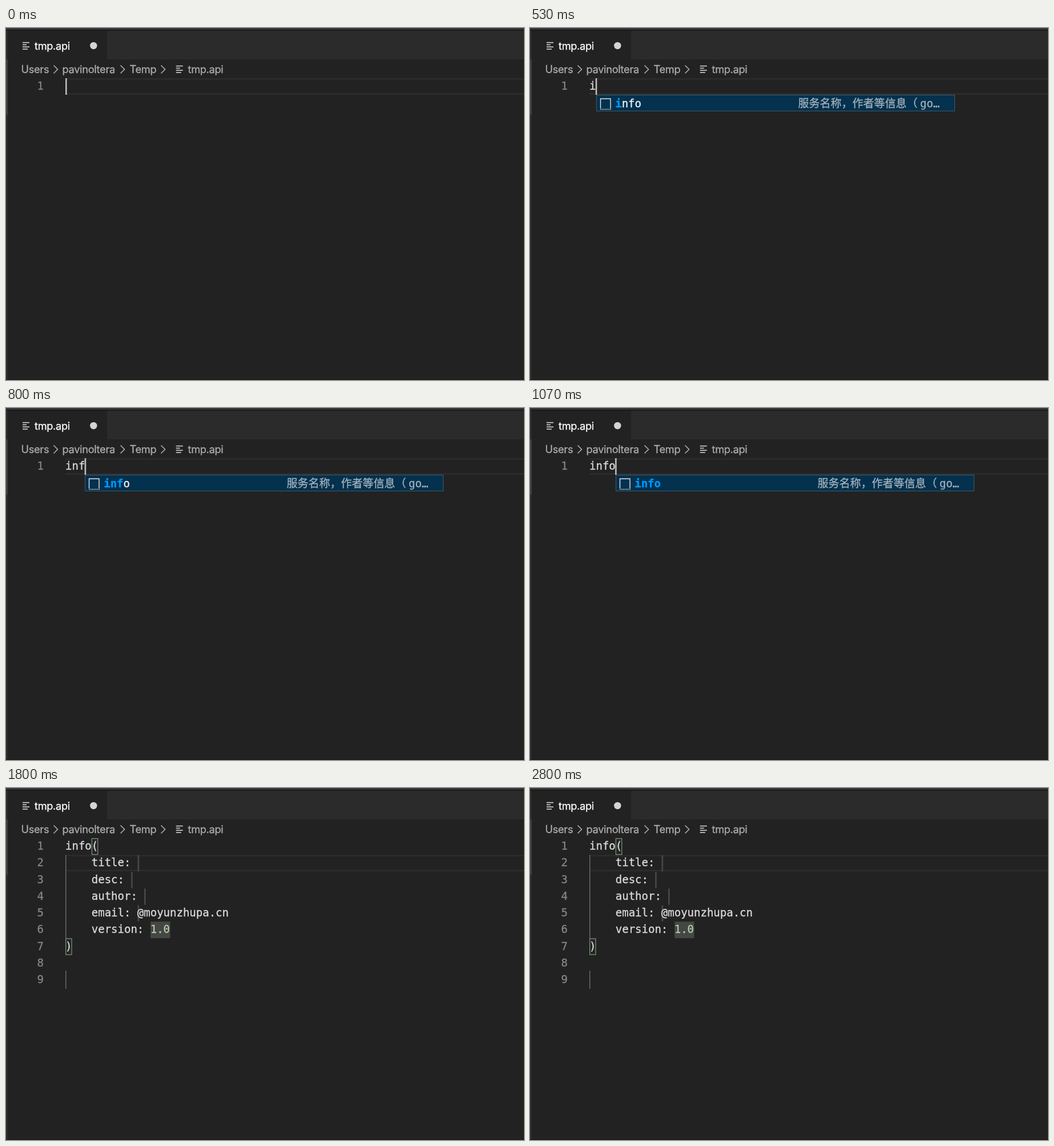
An HTML page that plays this animation: 907 by 617 pixels, repeating every 2.91 s.

```html
<!DOCTYPE html>
<html lang="zh-CN">
<head>
<meta charset="utf-8">
<title>tmp.api</title>
<style>
html, body { margin: 0; width: 100%; height: 100%; overflow: hidden; background: #222; }
svg { display: block; width: 907px; height: 617px; }
text, tspan { white-space: pre; fill: currentColor; stroke: currentColor; stroke-width: 0.3px; }
.ui { font: 18.2px Inter, "Open Sans", sans-serif; letter-spacing: -0.3px; color: #adadad; }
.tab { color: #fff; }
.code { font: 19px "DejaVu Sans Mono", "Liberation Mono", monospace; color: #dcdcdc; }
.num { color: #868686; }
.value { color: #b5cea8; }
.word { color: #f4f4f4; }
.hit { font-weight: bold; color: #0097fb; }
.cjk { font: 19px "Noto Sans CJK SC", "Noto Sans CJK", sans-serif; }
.hint { color: #a3b2bd; }
</style>
</head>
<body>
<svg id="stage" viewBox="0 0 907 617" xmlns="http://www.w3.org/2000/svg"></svg>
<script>
const LOOP = 2910;
const LEFT = 104, TOP = 88, ROW = 29.25, CHAR = 11.44;
const stage = document.getElementById("stage");

const col = n => LEFT + n * CHAR;
const row = n => TOP + (n - 1) * ROW;
const rect = (x, y, w, h, fill, more = "") =>
  `<rect x="${x}" y="${y}" width="${w}" height="${h}" fill="${fill}" ${more}/>`;
const text = (x, y, s, cls, more = "") =>
  `<text x="${x}" y="${y}" class="${cls}" ${more}>${s}</text>`;
const code = (c, n, s, cls = "") => text(col(c), row(n) + 20, s, "code " + cls);
const number = n => text(66, row(n) + 20, n, "code num", 'text-anchor="end"');

function fileIcon(x, y, fill) {
  return [12, 7, 12, 9].map((w, i) => rect(x, y + i * 3.8, w, 1.6, fill)).join("");
}

function chevron(x) {
  return `<path d="M${x} 65.5l7 7l-7 7" fill="none" stroke="#adadad" stroke-width="1.6"/>`;
}

function frame() {
  const crumb = (x, s) => text(x, 79, s, "ui");
  return rect(0, 0, 907, 617, "#222") +
    rect(177, 4, 730, 51, "#2b2b2b") +
    rect(0, 0, 907, 3, "#37373a") +
    rect(0, 3, 907, 1.5, "#171717") +
    rect(0, 4.5, 3, 612, "#2c2c2c") +
    rect(0, 55, 3, 97, "#404042") +
    rect(0, 616, 907, 1, "#191919") +
    fileIcon(29, 24.8, "#d8d8d8") +
    text(50, 38, "tmp.api", "ui tab") +
    '<circle cx="153.3" cy="31" r="6.2" fill="#d4d4d4"/>' +
    crumb(26.5, "Users") + chevron(83.5) +
    crumb(98.5, "pavinoltera") + chevron(200.5) +
    crumb(216.5, "Temp") + chevron(271.5) +
    fileIcon(297.7, 65.8, "#d0d0d0") + crumb(318.5, "tmp.api");
}

function activeLine(n) {
  const y = row(n);
  return rect(104, y, 803, 2.5, "#2d2d2d") + rect(104, y + 26.3, 803, 2.5, "#2d2d2d");
}

const caret = (x, n) => rect(x, row(n), 2.6, 29, "#bdbdbd");
const guide = (y, h) => rect(104, y, 1.4, h, "#6c6c6c");

// Completion list: its left edge follows the typed text
function popup(count) {
  const x = Math.floor(col(count) + 0.6), word = "info";
  return `<g transform="translate(${x} 0)">` +
    rect(0.5, 117.5, 627, 28, "#03314e", 'stroke="#3f5b6d"') +
    '<path d="M7.5 141V124H25V141" fill="none" stroke="#e4e4e4" stroke-width="1.4"/>' +
    '<path d="M7 142.5H26" stroke="#e4e4e4" stroke-width="1.6" stroke-dasharray="1.6 1.3"/>' +
    text(33.2, 139, `<tspan class="hit">${word.slice(0, count)}</tspan>${word.slice(count)}`, "code word") +
    text(353.5, 139, "服务名称，作者等信息（", "cjk hint") +
    text(567, 139, "go…", "code hint") +
    "</g>";
}

function typing(t) {
  const passed = times => times.filter(k => t >= k).length;
  const typed = passed([530, 630, 770, 970]);
  const shown = passed([530, 660, 800, 1000]);
  let s = activeLine(1) + number(1) + code(0, 1, "info".slice(0, typed));
  if (t < 300 || typed) s += caret(typed ? col(typed) - 0.7 : 104, 1);
  return s + (shown ? popup(shown) : "");
}

function bracketBox(c, n) {
  return rect(col(c) + 0.6, row(n) + 0.6, 10.4, 28, "#1f2a1f", 'stroke="#8a8f8a" stroke-width="1.2"');
}

function snippet(t) {
  const lines = ["info(", "title: ", "desc: ", "author: ", "email: @moyunzhupa.cn", "version: ", ")"];
  const stops = [[11, 2], [10, 3], [12, 4], [11, 5]];
  let s = activeLine(2);
  for (let n = 1; n <= 9; n++) s += number(n);
  s += guide(row(2), ROW * 5) + guide(row(9) - 2, 32);
  for (const [c, n] of stops) s += rect(col(c) + 0.7, row(n) + 0.5, 2.6, 28.5, "#484848");
  s += rect(col(13) + 0.4, row(6), CHAR * 3, 29, "#454745");
  if (t >= 1370) s += bracketBox(4, 1) + bracketBox(0, 7);
  lines.forEach((line, i) => { s += code(i > 0 && i < 6 ? 4 : 0, i + 1, line); });
  s += code(13, 6, "1.0", "value");
  if (t < 1800 || (t >= 2300 && t < 2800)) s += caret(228.3, 2);
  return s;
}

const base = frame();
let last = "";

function draw() {
  const t = performance.now() % LOOP;
  const view = t < 1300 ? typing(t) : snippet(t);
  if (view !== last) stage.innerHTML = base + view;
  last = view;
  requestAnimationFrame(draw);
}
draw();
</script>
</body>
</html>
```
